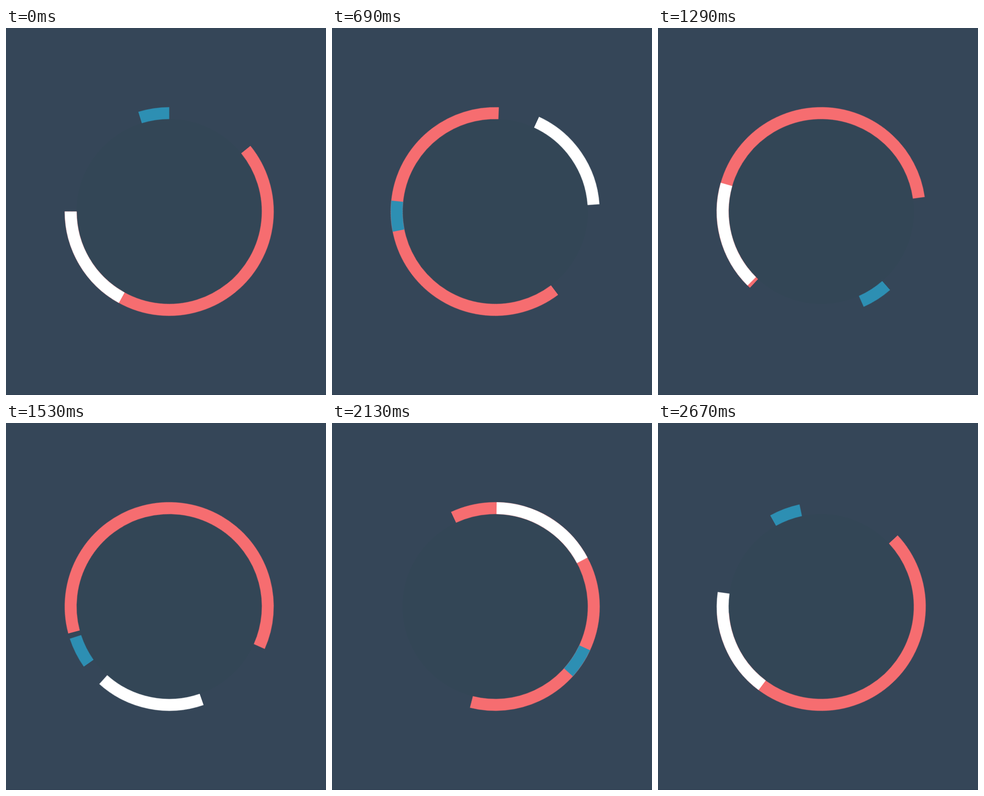
Recreate the animation shown at these times as an HTML page. Size 698 by 802 pixels, loop 2.7 s.

```html
<!DOCTYPE html>
<html lang="en">
<head>
<meta charset="utf-8">
<title>Ring loader</title>
<style>
  html, body { margin: 0; width: 100%; height: 100%; overflow: hidden; background: #354658; }
  svg { display: block; }
  .arc { fill: none; stroke-width: 26; filter: blur(.6px); }
</style>
</head>
<body>
<svg width="698" height="802" viewBox="0 0 698 802">
  <rect y="801" width="698" height="1" fill="#2f3c50"/>
  <g id="ring" transform="translate(356 401)">
    <circle r="202" fill="#334656"/>
  </g>
</svg>
<script>
const LOOP = 2700, STEP = 30;

// Angles in degrees, clockwise from the top; turns = revolutions per loop.
const arcs = [
  { color: '#f66d70', head: 270, length: 219, turns: 1 },
  { color: '#ffffff', head: 270, length: 61.2, turns: -2 },
  { color: '#2d8fb3', head: 0, length: 17.2, turns: 3 },
];

const ring = document.getElementById('ring');
for (const arc of arcs) {
  arc.node = document.createElementNS(ring.namespaceURI, 'circle');
  const attributes = {
    class: 'arc', r: 215, stroke: arc.color, pathLength: 360,
    'stroke-dasharray': `${arc.length} ${360 - arc.length}`,
  };
  for (const name in attributes) arc.node.setAttribute(name, attributes[name]);
  ring.append(arc.node);
}

function draw() {
  const time = Math.floor(performance.now() / STEP) * STEP % LOOP;
  for (const { node, head, length, turns } of arcs) {
    const start = head - length - 90 + turns * 360 * time / LOOP;
    node.setAttribute('transform', `rotate(${start})`);
  }
  requestAnimationFrame(draw);
}
draw();
</script>
</body>
</html>
```
